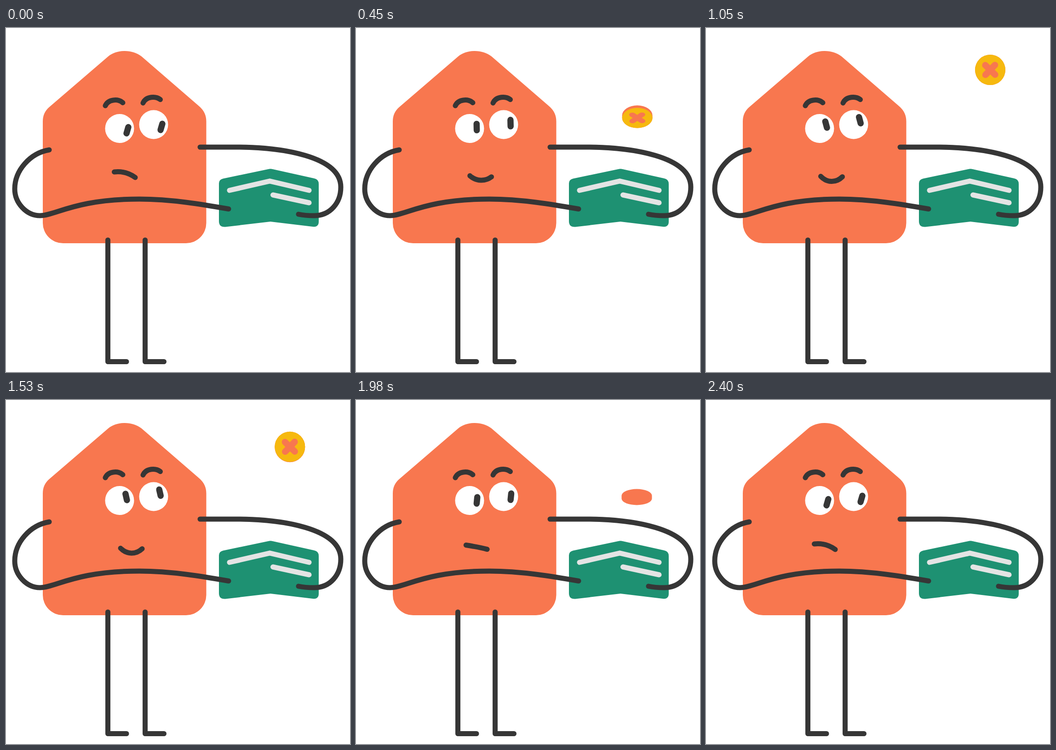
These frames come from a looping animation (748x748 px, 2700 ms). An HTML page:

```html
<!DOCTYPE html>
<html lang="en">
<head>
<meta charset="utf-8">
<title>Coin toss</title>
<style>
  html, body { margin: 0; width: 100%; height: 100%; overflow: hidden; background: #fff; }
  svg { display: block; width: 100%; height: 100%; }
  .line { fill: none; stroke: #363636; stroke-width: 11; stroke-linecap: round; stroke-linejoin: round; }
  .stripe { stroke: #e4e4e4; stroke-linejoin: miter; }
  .pupil { stroke-width: 13.5; }
  .cross { stroke: #f8774f; stroke-width: 14; }
  .orange { fill: #f8774f; }
  .yellow { fill: #f6b90f; }
  .green { fill: #1e9172; }
</style>
</head>
<body>
<svg viewBox="0 0 748 748">
  <path class="orange" d="M80 203Q80 184 94 172L222 62C241 46 275 46 295 62L421 171Q435.500 184 435.500 203V424A44 44 0 0 1 391.500 468H124A44 44 0 0 1 80 424Z"/>
  <path class="line" d="M221.500 461V725.500H262M302.500 461V725.500H343.500"/>
  <path class="line" d="M216 169C222 155 243 153 254 162.500M298 163C305 148 326 148 335.500 155.500"/>
  <circle cx="247" cy="218.500" r="31.500" fill="#fff"/>
  <circle cx="321" cy="210" r="31.500" fill="#fff"/>
  <path class="line pupil" id="leftPupil" d="M0-7V7"/>
  <path class="line pupil" id="rightPupil" d="M0-7V7"/>
  <path class="line" id="mouth"/>

  <g id="coin">
    <path class="orange" id="rim"/>
    <g id="face">
      <circle class="yellow" r="33"/>
      <path class="line cross" d="M-10.500-10.500L10.500 10.500M10.500-10.500L-10.500 10.500" transform="rotate(-1)"/>
    </g>
  </g>

  <path class="green" d="M472 327.500L570 307Q575 305.500 580 307L670 327Q680 329 680 339V421Q680 433.500 667 432L575 421L477 432.500Q463 433.500 463 420V338Q463 329.500 472 327.500Z"/>
  <path class="line stripe" d="M486 353L573.500 333L659 353M580.500 363L659 380"/>
  <path class="line" d="M94 265C52 272 19 310 19 350C19 380 44 408 74 408C107 408 150 372 290 372C360 372 430 384 484 393.500"/>
  <path class="line" d="M422 259H490C600 258 728 279 728 346C728 380 705 408 670 408C657 408 645 407 636 405"/>
</svg>
<script>
  const LOOP = 2700, STEP = 30, REST = 2400, PEAK = 1210;
  const RADIUS = 33, THICKNESS = 7, TOP_Y = 89.5, HIDDEN_Y = 372;
  const SAD = [235.5, 313, 252, 311, 266, 314.5, 281, 325];
  const SMILE = [249.5, 322.5, 263, 337, 283, 337, 296.5, 323.5];

  const el = id => document.getElementById(id);
  const set = (id, name, value) => el(id).setAttribute(name, value);
  const mix = (a, b, k) => a + (b - a) * k;
  const smooth = (t, from, to) => {
    const x = Math.min(1, Math.max(0, (t - from) / (to - from)));
    return x * x * (3 - 2 * x);
  };

  function drawPupils(k) {
    const turn = `rotate(${mix(16, -15, k)})`;
    set('leftPupil', 'transform', `translate(${mix(264, 261.2, k)} ${mix(222.3, 210, k)}) ${turn}`);
    set('rightPupil', 'transform', `translate(${mix(338, 334.5, k)} ${mix(215, 200.5, k)}) ${turn}`);
  }

  function drawMouth(k) {
    const p = SAD.map((v, i) => mix(v, SMILE[i], k));
    set('mouth', 'd', `M${p.slice(0, 2)}C${p.slice(2)}`);
  }

  function drawCoin(t) {
    const rising = t < PEAK;
    const drop = rising
      ? 18.5 * ((PEAK - t) / 400) ** 2.68
      : 12.5 * ((t - PEAK) / 320) ** 2.59;
    const y = Math.min(HIDDEN_Y, TOP_Y + drop);
    const degrees = rising ? 48 * (drop / 103) ** 1.4 : -115 * (drop / 121) ** 1.4;
    const tilt = degrees * Math.PI / 180;
    const squash = Math.cos(tilt);
    const offset = THICKNESS / 2 * Math.sin(tilt);
    const half = Math.abs(offset);
    const arc = `A${RADIUS} ${RADIUS * Math.abs(squash)} 0 0 1 `;

    set('coin', 'transform', `translate(${618 - (y - 91) * 0.0625} ${y})`);
    set('rim', 'd', `M${-RADIUS} ${-half}${arc}${RADIUS} ${-half}V${half}${arc}${-RADIUS} ${half}Z`);
    set('face', 'transform', `translate(0 ${offset}) scale(1 ${Math.max(squash, 0.001)})`);
    set('face', 'visibility', squash > 0 ? 'visible' : 'hidden');
  }

  function draw(now) {
    const t = Math.min(REST, Math.floor(now % LOOP / STEP) * STEP);
    drawPupils(smooth(t, 0, 830) - smooth(t, 1375, 2360));
    drawMouth(smooth(t, 0, 580) - smooth(t, 1447, 2255));
    drawCoin(t);
  }

  const start = performance.now();
  function tick() {
    draw(performance.now() - start);
    requestAnimationFrame(tick);
  }
  tick();
</script>
</body>
</html>
```
